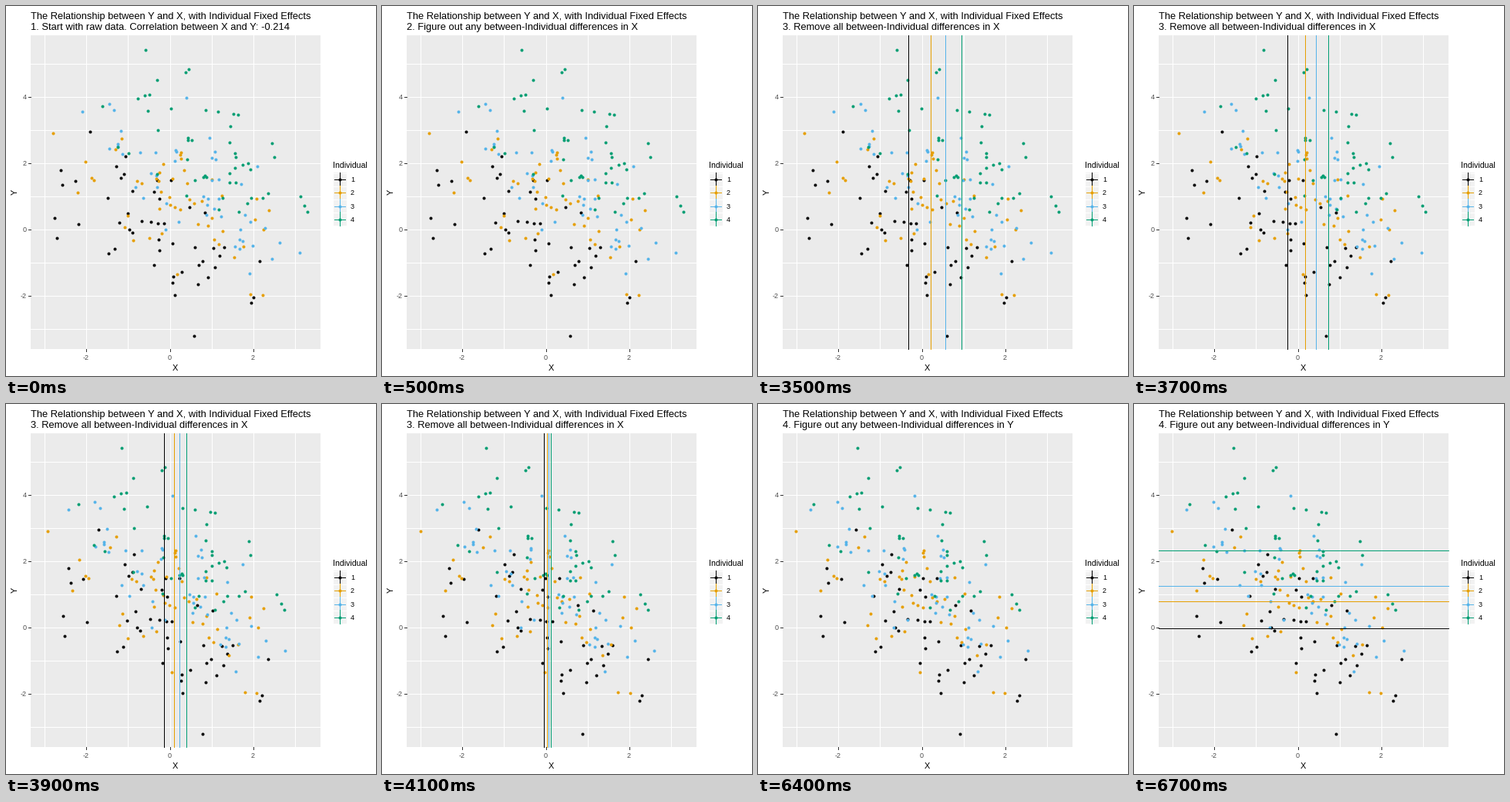
These frames come from a looping animation (480 by 480 pixels, 8 s). A matplotlib script:

```python
import numpy as np
import matplotlib.pyplot as plt
from matplotlib.animation import FuncAnimation
from matplotlib.patches import Rectangle

SIZE, DPI = 480, 80
PX = 72 / DPI                      # one pixel in points
LEFT, RIGHT, TOP, BOTTOM = 32, 408, 38, 445
ZERO_X, ZERO_Y = 211.6, 289        # pixel place of the data origin
UNIT_X, UNIT_Y = 54.2, 43
STEP_MS, FRAMES = 100, 80

TITLE = "The Relationship between Y and X, with Individual Fixed Effects"
STAGES = [  # first frame, subtitle
    (0, "1. Start with raw data. Correlation between X and Y: -0.214"),
    (5, "2. Figure out any between-Individual differences in X"),
    (35, "3. Remove all between-Individual differences in X"),
    (64, "4. Figure out any between-Individual differences in Y"),
]

# Per individual: colour, mean X, mean Y, extreme points
GROUPS = [
    ("#000000", -.335, -.03, [(-2.62, 1.8), (-1.91, 2.96), (.58, -3.2), (1.95, -2.2)]),
    ("#E69F00", .225, .78, [(-2.8, 2.9), (-1.3, 2.43), (.17, -1.36), (2.24, 0)]),
    ("#56B4E9", .57, 1.25, [(-2.1, 3.55), (.4, 3.98), (3.1, -.7), (1.91, -1.33)]),
    ("#009E73", .97, 2.32, [(-.58, 5.42), (-1.62, 3.73), (3.3, .53), (2.45, 2.6)]),
]
PER_GROUP, SLOPE, SPREAD_X, SPREAD_Y = 50, -.55, 1.1, .95

plt.rcParams["font.family"] = "Liberation Sans"
fig = plt.figure(figsize=(SIZE / DPI, SIZE / DPI), dpi=DPI, facecolor="white")
ax = fig.add_axes([0, 0, 1, 1])
ax.set(xlim=(0, SIZE), ylim=(SIZE, 0))
ax.axis("off")
rng = np.random.default_rng(7)


def to_col(x):
    return ZERO_X + UNIT_X * x


def to_row(y):
    return ZERO_Y - UNIT_Y * y


def box(x0, y0, x1, y1, color):
    ax.add_patch(Rectangle((x0, y0), x1 - x0, y1 - y0, fc=color, lw=0,
                           antialiased=False, zorder=0))


def line(xs, ys, color, z):
    return ax.plot(xs, ys, color=color, lw=PX, zorder=z,
                   antialiased=False, solid_capstyle="butt")[0]


def vline(col, y0, y1, color, z=1):
    return line([round(col) + .5] * 2, [y0, y1], color, z)


def hline(row, x0, x1, color, z=1):
    return line([x0, x1], [round(row) + .5] * 2, color, z)


def text(x, y, s, px, color="black", **kw):
    return ax.text(x, y, s, fontsize=px * PX, color=color,
                   **{"va": "baseline", **kw})


def dots(x, y, color):
    return ax.plot(x, y, "o", ms=4 * PX, mew=0, color=color, zorder=3,
                   antialiased=False)[0]


def sample(mean_x, mean_y, extremes):
    """Seeded points sloping down around the group mean."""
    n = PER_GROUP - len(extremes)
    u, v = rng.triangular(-2.45, 0, 2.45, (2, n))
    u, v = u - u.mean(), v - v.mean()
    x = mean_x + SPREAD_X * u
    y = mean_y + SLOPE * (x - mean_x) + SPREAD_Y * v
    return np.vstack([extremes, np.column_stack([x, y])])


def draw_panel():
    box(LEFT, TOP, RIGHT, BOTTOM, "#EBEBEB")
    for v in range(-3, 4):
        col = to_col(v)
        vline(col, TOP, BOTTOM, "white")
        if v % 2 == 0:
            vline(col, BOTTOM, BOTTOM + 3, "#333333")
            text(col + .5, 459, str(v), 9, "#4D4D4D", ha="center")
    for v in range(-3, 6):
        row = to_row(v)
        hline(row, LEFT, RIGHT, "white")
        if v % 2 == 0:
            hline(row, LEFT - 3, LEFT, "#333333")
            text(27, row + 4, str(v), 9, "#4D4D4D", ha="right")
    text(219, 473, "X", 11, ha="center")
    text(12, 241.5, "Y", 11, ha="center", va="center", rotation=90)
    text(31.5, 17, TITLE, 12.87)


def draw_legend():
    text(424, 210, "Individual", 10.5)
    for i, (color, *_) in enumerate(GROUPS):
        y0, mid, y1 = (round(215.5 + k * 17.28) for k in (i, i + .5, i + 1))
        box(425, y0, 442, y1, "#F2F2F2")
        hline(y0, 425, 442, "white")
        vline(432, y0, y1, color, 4)
        hline(mid, 426, 440, color, 4)
        dots([432.5], [mid + .5], color)
        text(447, mid + 4, str(i + 1), 9)


draw_panel()
draw_legend()
subtitle = text(31.5, 31, "", 12.87)
clouds = [sample(*group[1:]) for group in GROUPS]
marks = [dots([], [], group[0]) for group in GROUPS]
x_means = [vline(0, TOP, BOTTOM, group[0], 4) for group in GROUPS]
y_means = [hline(to_row(group[2]), LEFT, RIGHT, group[0], 4) for group in GROUPS]


def update(frame):
    subtitle.set_text([s for start, s in STAGES if frame >= start][-1])
    phase = np.clip((frame - 34) / 9, 0, 1)
    ease = (1 - np.cos(np.pi * phase)) / 2
    for (_, mean_x, *_), pts, mark, vl, hl in zip(
            GROUPS, clouds, marks, x_means, y_means):
        shift = -ease * mean_x
        mark.set_data(np.round(to_col(pts[:, 0] + shift)) + .5,
                      np.round(to_row(pts[:, 1])) + .5)
        vl.set_xdata([round(to_col(mean_x + shift)) + .5] * 2)
        vl.set_visible(8 <= frame < 64)
        hl.set_visible(frame >= 67)
    return [subtitle, *marks, *x_means, *y_means]


anim = FuncAnimation(fig, update, frames=FRAMES, interval=STEP_MS,
                     repeat=True, repeat_delay=0, blit=False)
plt.show()
```
